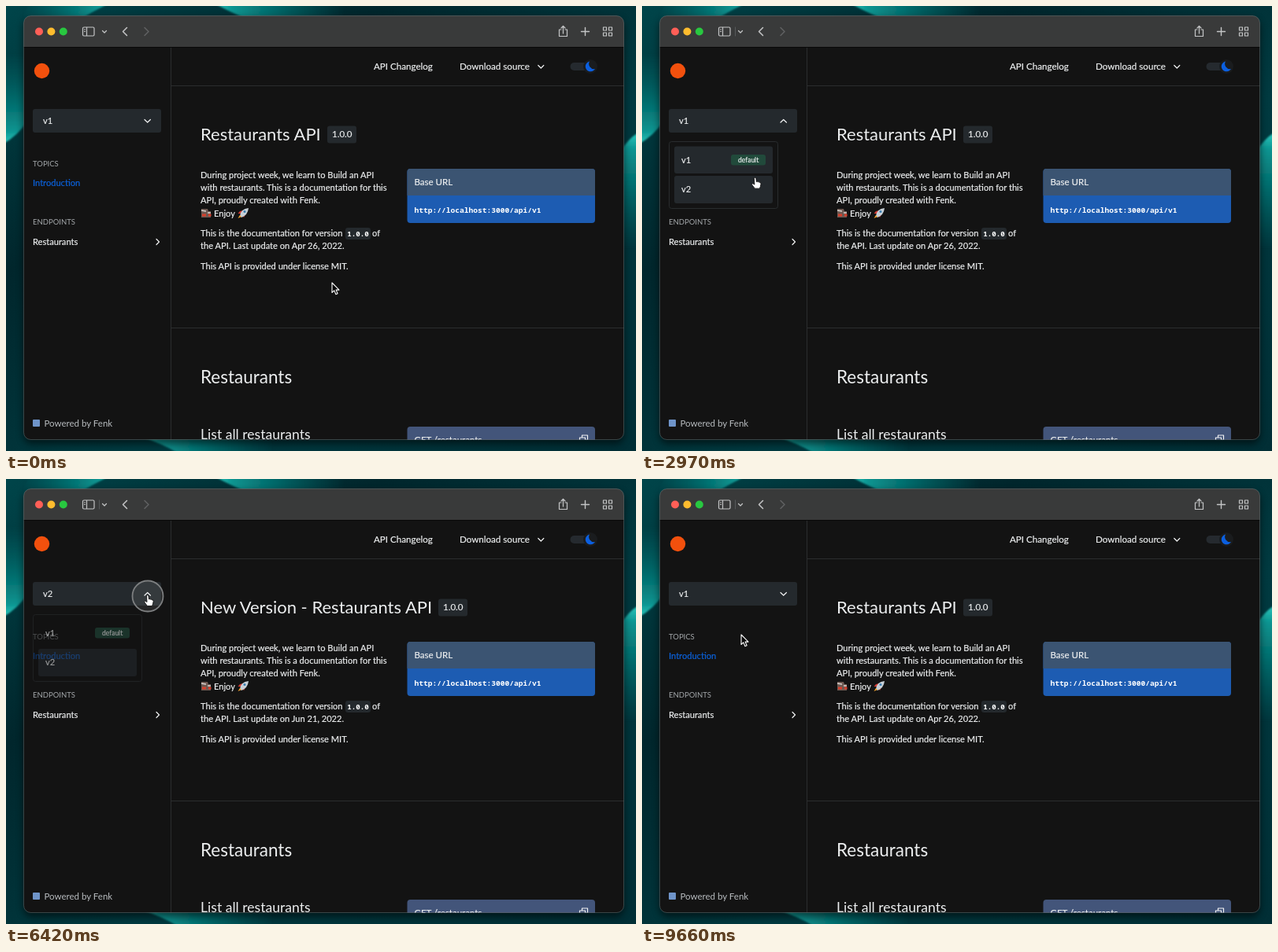
Recreate the animation shown at these times as an HTML page. Size 800 by 566 pixels, loop 9.69 s.

```html
<!DOCTYPE html>
<html lang="en">
<head>
<meta charset="utf-8">
<title>API documentation</title>
<style>
html, body { margin: 0; width: 100%; height: 100%; overflow: hidden; background: #012a30; }
svg { display: block; width: 800px; height: 566px; }
text { font: 11.5px Lato, sans-serif; fill: #eceeef; stroke: #eceeef; stroke-width: .2px; white-space: pre; }
.nav { font-size: 11.6px; }
.body { font-size: 11.1px; }
.label { font-size: 9.5px; fill: #a4a8ab; stroke: none; }
.current { fill: #0b62dc; stroke: #0b62dc; }
.quiet { fill: #b9bdc0; stroke: none; }
.h1 { font-size: 22px; stroke: none; }
.h2 { font-size: 22.5px; stroke: none; }
.h3 { font-size: 17.6px; stroke: none; }
.mono { font: 600 9.58px "Noto Sans Mono", monospace; fill: #fff; stroke: none; }
.line { fill: none; stroke: #f1f2f3; stroke-width: 1.2; stroke-linecap: round; stroke-linejoin: round; }
.tool { fill: none; stroke: #c4c5c6; stroke-width: 1.2; stroke-linecap: round; stroke-linejoin: round; }
.rule { stroke: #2b2d2e; fill: none; }
.box { fill: #24292d; }
</style>
</head>
<body>
<svg viewBox="0 0 800 566">
  <defs>
    <clipPath id="frame"><rect x="22.5" y="12.5" width="762" height="539" rx="9"/></clipPath>
    <linearGradient id="sea" x2="1" y2="1">
      <stop offset="0" stop-color="#00454a"/>
      <stop offset=".3" stop-color="#01262c"/>
      <stop offset=".6" stop-color="#013a40"/>
      <stop offset="1" stop-color="#012e35"/>
    </linearGradient>
    <linearGradient id="fadeRight">
      <stop offset="0" stop-color="#2fc9bf"/>
      <stop offset=".15" stop-color="#0a9490"/>
      <stop offset="1" stop-color="#057c7c" stop-opacity="0"/>
    </linearGradient>
    <linearGradient id="fadeLeft" href="#fadeRight" x1="1" x2="0"/>
    <linearGradient id="fadeDown" href="#fadeRight" x2="0" y2="1"/>
    <linearGradient id="fadeUp" href="#fadeRight" x2="0" y1="1"/>
    <filter id="soft"><feGaussianBlur stdDeviation="1"/></filter>
    <filter id="shade" x="-10%" y="-10%" width="120%" height="120%"><feGaussianBlur stdDeviation="5"/></filter>
  </defs>

  <rect width="800" height="566" fill="url(#sea)"/>
  <g filter="url(#soft)">
    <path d="M30-5H134Q112 6 92 18H20Z" fill="url(#fadeLeft)"/>
    <path d="M262-5H430V18H310Q284 8 262-5Z" fill="url(#fadeRight)"/>
    <path d="M-5 60H26V148Q14 166-5 176Z" fill="url(#fadeUp)"/>
    <path d="M780 186Q790 168 805 160V310H780Z" fill="url(#fadeDown)"/>
    <path d="M172 548H340V571H222Q198 556 172 548Z" fill="url(#fadeRight)"/>
  </g>
  <rect x="22" y="16" width="763" height="541" rx="11" fill="#000" opacity=".55" filter="url(#shade)"/>

  <g clip-path="url(#frame)">
    <rect x="22" y="12" width="763" height="540" fill="#131313"/>
    <rect x="22" y="12" width="763" height="40" fill="#393a3a"/>
    <path d="M22 52.5H785" stroke="#080808"/>
    <circle cx="42" cy="32.5" r="5" fill="#ff5f57"/>
    <circle cx="57.4" cy="32.5" r="5" fill="#febc2e"/>
    <circle cx="72.8" cy="32.5" r="5" fill="#28c840"/>
    <g class="tool">
      <path d="M99 27H110.5Q112 27 112 28.5V36.5Q112 38 110.5 38H99Q97.5 38 97.5 36.5V28.5Q97.5 27 99 27M102.5 27V38M99.5 30H100.5M99.5 32.5H100.5M122.5 31.5L125 34L127.5 31.5"/>
      <path d="M153.5 27.5L148.5 32.5L153.5 37.5" stroke-width="1.5"/>
      <path d="M176 27.5L181 32.5L176 37.5" stroke="#606162" stroke-width="1.5"/>
      <path id="divider" d="M118.5 27V38" stroke="#57595a" stroke-width="1"/>
      <path id="share" d="M705 30H702.5V38.5H712.5V30H710M707.5 35V25.5M705 28L707.5 25.5L710 28"/>
      <path d="M730.5 32.5H740.5M735.5 27.5V37.5" stroke-width="1.4"/>
      <path d="M758.5 27H762.5V31H758.5ZM765.5 27H769.5V31H765.5ZM758.5 34H762.5V38H758.5ZM765.5 34H769.5V38H765.5Z"/>
    </g>

    <path class="rule" d="M209.5 53V552M210 101.5H785M210 409.5H785"/>

    <circle cx="45.5" cy="82.5" r="9.7" fill="#f2500d"/>
    <rect class="box" x="34" y="131" width="163" height="30" rx="3"/>
    <text id="version" class="body" x="47" y="150"></text>
    <path id="chevron" class="line" d="M176 144.500L179.700 148L183.400 144.500"/>
    <text class="label" x="34" y="203.5">TOPICS</text>
    <text class="body current" x="34" y="229">Introduction</text>
    <text class="label" x="34" y="278">ENDPOINTS</text>
    <text class="body" x="34" y="304">Restaurants</text>
    <path class="line" d="M191 296.5L194.5 300L191 303.5"/>
    <rect x="34" y="526" width="9" height="9" rx="1" fill="#6f94c9"/>
    <text class="quiet" x="48.5" y="535">Powered by Fenk</text>

    <text class="nav" x="467" y="81">API Changelog</text>
    <text class="nav" x="576" y="81">Download source</text>
    <path class="line" d="M675.8 75.5L679.3 79L682.8 75.5"/>
    <rect x="716.5" y="72" width="28" height="10" rx="5" fill="#252a2f"/>
    <circle cx="742" cy="77" r="9" fill="#1a1c1e"/>
    <path d="M741 70.5A6.5 6.5 0 1 0 748 80A6.5 6.5 0 0 1 741 70.5Z" fill="#0b5fe0"/>

    <text id="title" class="h1" x="247" y="171"></text>
    <g id="badge">
      <rect class="box" x="408" y="152.5" width="37" height="22" rx="3"/>
      <text x="414" y="167">1.0.0</text>
    </g>
    <text class="body" x="247" y="219">During project week, we learn to Build an API</text>
    <text class="body" x="247" y="235">with restaurants. This is a documentation for this</text>
    <text class="body" x="247" y="251">API, proudly created with Fenk.</text>
    <g>
      <path d="M248 258H256L257 261H260V269H248Z" fill="#6d5952"/>
      <path d="M248 260L254 261M256 263H260" stroke="#d9d4d0" stroke-width="1.5"/>
      <path d="M249 266H254M257 266H260.5" stroke="#d8402c" stroke-width="3"/>
      <path d="M297 261L301 260L304 265L302 269L300 266L297 264L294.5 264Z" fill="#d23c35"/>
      <path d="M297 267Q298 258 308 257Q307 266 299 269Z" fill="#c7d0d7"/>
      <circle cx="303" cy="261.5" r="1.5" fill="#3a7db0"/>
      <path d="M297 266L294.5 270L299 268Z" fill="#f5a52f"/>
    </g>
    <text class="body" x="264" y="268">Enjoy</text>
    <text class="body" x="247" y="293">This is the documentation for version</text>
    <rect class="box" x="431" y="282" width="32" height="15" rx="3"/>
    <text class="mono" x="433.2" y="293" style="font-size:9.2px">1.0.0</text>
    <text class="body" x="465" y="293">of</text>
    <text id="updated" class="body" x="247" y="309"></text>
    <text class="body" x="247" y="334.5">This API is provided under license MIT.</text>

    <rect x="509.5" y="207" width="238.5" height="69" rx="4" fill="#1d5cb2"/>
    <path d="M509.5 241V211Q509.5 207 513.5 207H744Q748 207 748 211V241Z" fill="#3b5472"/>
    <text x="518.5" y="228">Base URL</text>
    <text class="mono" x="518.5" y="262.5">http://localhost:3000/api/v1</text>

    <text class="h2" x="247" y="480">Restaurants</text>
    <text class="h3" x="247" y="550.5">List all restaurants</text>
    <rect x="509.5" y="535" width="238.5" height="30" rx="4" fill="#43557a"/>
    <text x="518.5" y="555.5">GET /restaurants</text>
    <path class="line" d="M731.5 548V546H738.5V552H736.5M728.5 549H735.5V555H728.5Z"/>

    <g id="menu">
      <rect x="34.5" y="172.5" width="138" height="85" rx="3" fill="#131313" stroke="#292c2e"/>
      <rect id="row1" class="box" x="41" y="178.5" width="125" height="34.5" rx="3"/>
      <rect id="row2" class="box" x="41" y="216" width="125" height="35" rx="3"/>
      <text class="body" x="50" y="199.5">v1</text>
      <text class="body" x="50" y="237">v2</text>
      <rect x="113" y="189" width="44" height="13.5" rx="3" fill="#214a3b"/>
      <text x="122" y="198.5" style="font-size:8.5px">default</text>
    </g>
  </g>
  <rect x="22.5" y="12.5" width="762" height="539" rx="9" fill="none" stroke="#fff" stroke-opacity=".2"/>

  <circle id="ring" r="19.5" fill="#fff" fill-opacity=".08" stroke="#7d7f80" stroke-width="1.8"/>
  <path id="arrow" d="M0 0V12.5L2.8 9.9L4.9 14.7L7.1 13.7L5.1 9.1H9Z" fill="#080808" stroke="#fff" stroke-width="1.1" stroke-linejoin="round"/>
  <path id="hand" d="M-1.5 1Q-1.5-.5-.3-.5Q1-.5 1 1L1.5 5Q3 4 3.7 5.2Q5 4.5 5.5 6Q7.3 5.5 7.2 7.5L6.5 11L5.5 13.5H-.5L-4 9Q-5 7-3 7L-1 8.5Z" fill="#fff" stroke="#111" stroke-width=".9" stroke-linejoin="round"/>
</svg>

<script>
const LOOP = 9690;
const START = [414, 352];
// start, end, target x, target y
const MOVES = [
  [300, 1177, 180, 148],
  [2350, 3200, 136, 234],
  [5400, 6050, 180, 148],
  [6930, 7680, 126, 198]
];
const OPEN = [1600, 6250];
const PICK = [3680, 8150];
const LOADED = [4500, 8850];

const el = id => document.getElementById(id);
const clamp = v => Math.max(0, Math.min(1, v));
const smooth = v => v * v * (3 - 2 * v);
const between = (t, [a, b]) => t >= a && t < b;
const show = (id, alpha) => el(id).setAttribute("opacity", +alpha);
const place = (id, x, y) => el(id).setAttribute("transform", `translate(${x} ${y})`);

function pointerAt(t) {
  let [x, y] = START;
  for (const [from, to, tx, ty] of MOVES) {
    const p = smooth(clamp((t - from) / (to - from)));
    x += (tx - x) * p;
    y += (ty - y) * p;
  }
  return [x, y];
}

function draw(t) {
  const [x, y] = pointerAt(t);
  const v2 = between(t, LOADED);
  const open = OPEN.some((o, i) => between(t, [o + 50, PICK[i] + 50]));
  const menuAlpha = OPEN.reduce((sum, o, i) =>
    sum + clamp((t - o - 50) / 200) - clamp((t - PICK[i] - 50) / 270), 0);
  const loading = PICK.some((p, i) => between(t, [p + 80, LOADED[i]]));
  const overSelect = x > 34 && x < 197 && y > 131 && y < 161;
  const overMenu = open && x > 41 && x < 166 && y > 178 && y < 251;
  const hand = overSelect || overMenu;

  el("title").textContent = (v2 ? "New Version - " : "") + "Restaurants API";
  el("updated").textContent = `the API. Last update on ${v2 ? "Jun 21" : "Apr 26"}, 2022.`;
  el("version").textContent = v2 ? "v2" : "v1";
  place("badge", v2 ? 141 : 0, 0);

  const flipped = open || menuAlpha > 0;
  el("chevron").setAttribute("transform", flipped ? "matrix(1 0 0 -1 0 292.5)" : "");
  show("menu", menuAlpha);
  show("row1", !v2 || (y > 181 && y < 213));
  show("row2", v2 || (y > 216 && y < 251));
  show("share", loading ? .3 : 1);
  show("divider", t > OPEN[0]);

  const click = [...OPEN, ...PICK].find(c => between(t, [c, c + 320]));
  show("ring", click === undefined ? 0 : clamp((t - click) / 60) * clamp((click + 320 - t) / 120));
  place("ring", x, y + 1);
  place("arrow", x, y);
  place("hand", x, y);
  show("arrow", !hand);
  show("hand", hand);
}

function tick() {
  draw(performance.now() % LOOP);
  requestAnimationFrame(tick);
}
tick();
</script>
</body>
</html>
```
